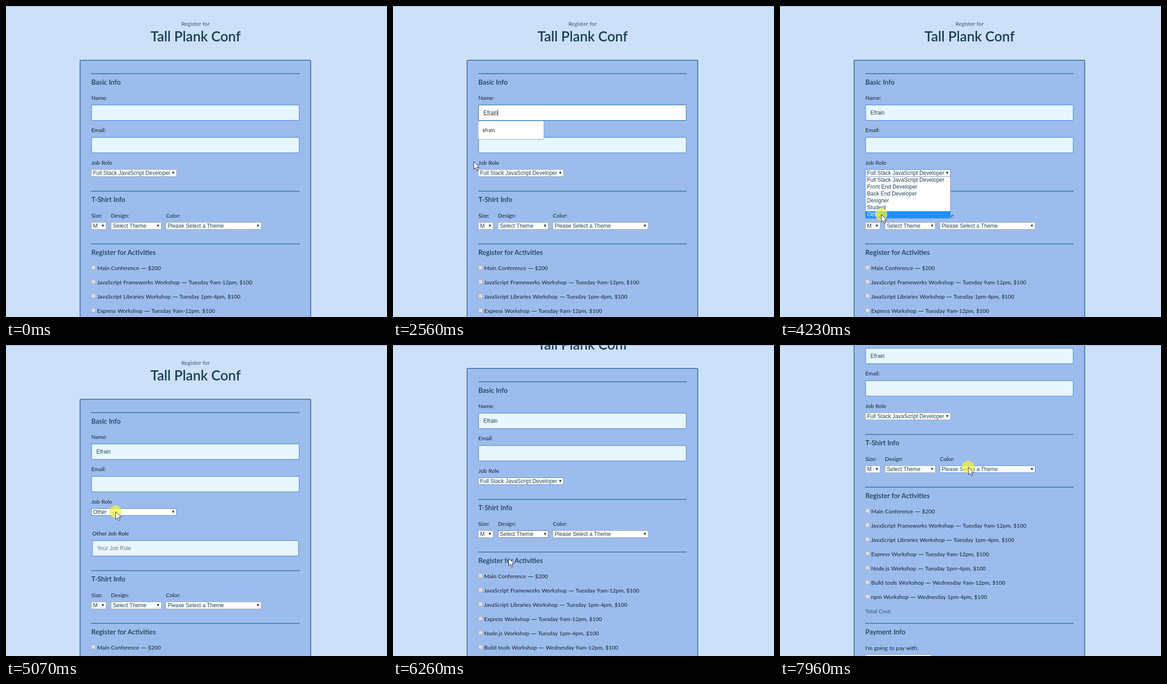
Write an HTML page that moves like this. It is 828 px wide and 676 px high and loops after 8000 ms.

```html
<!DOCTYPE html>
<html lang="en">
<head>
<meta charset="utf-8">
<title>Registration form</title>
<style>
  html, body { margin: 0; width: 100%; height: 100%; overflow: hidden; background: #cce0f9; }
  svg { display: block; width: 100%; height: 100%; }
  text { white-space: pre; }
  .label { font: 12px Lato, "Open Sans", sans-serif; letter-spacing: .03px; word-spacing: .5px; fill: #14222d; }
  .dash { font-family: "Open Sans", sans-serif; }
  .soft { fill: #34566f; }
  .head { font: 600 14.8px Lato, "Open Sans", sans-serif; fill: #183f56; }
  .title { font: 600 30px Lato, "Open Sans", sans-serif; fill: #183f56; }
  .field { font: 11.85px "Liberation Sans", Arial, sans-serif; fill: #1f4558; }
  .hint { fill: #75797c; }
  .suggest { font: 10px "Open Sans", sans-serif; fill: #111; }
  .mid { text-anchor: middle; }
  .rule { stroke: #2f6a94; stroke-width: 1.6; }
  .input { fill: #e8f6fd; stroke: #5e92dd; stroke-width: 1.4; }
  .select { fill: #fff; stroke: #a9a9a9; }
  .list { fill: #fff; stroke: #6d93c4; }
  .arrow { fill: #14242e; }
  .box { fill: #dfdfdf; stroke: #a8a8a8; stroke-width: .8; }
</style>
</head>
<body>
<svg id="stage" viewBox="0 0 828 676" preserveAspectRatio="none"></svg>
<script>
const LOOP = 8000;
const NAME = 'Efrain';
const ROW = 15;
const EXTRA = 88; // height of the optional job role block

const roles = ['Full Stack JavaScript Developer', 'Front End Developer', 'Back End Developer',
  'Designer', 'Student', 'Other'];
const themes = ['Select Theme', 'Theme - JS Puns', 'Theme - I ♥ JS'];
const activities = [
  'Main Conference — $200',
  'JavaScript Frameworks Workshop — Tuesday 9am-12pm, $100',
  'JavaScript Libraries Workshop — Tuesday 1pm-4pm, $100',
  'Express Workshop — Tuesday 9am-12pm, $100',
  'Node.js Workshop — Tuesday 1pm-4pm, $100',
  'Build tools Workshop — Wednesday 9am-12pm, $100',
  'npm Workshop — Wednesday 1pm-4pm, $100'
];

// [time, x, y]
const pointer = [
  [40, 562, 521], [790, 221, 227], [920, 221, 227], [1190, 232, 405], [1420, 228, 405],
  [2160, 184, 352], [2350, 163, 345], [2560, 175, 338], [2950, 210, 364], [3250, 222, 365],
  [3510, 240, 399], [3910, 222, 441], [4120, 220, 453], [4350, 220, 453], [4800, 238, 362],
  [5200, 238, 362], [5560, 240, 379], [5690, 240, 379], [5960, 251, 463], [6850, 251, 463],
  [7300, 275, 269], [7680, 288, 275], [7860, 409, 265], [8000, 409, 265]
];
// [time, offset]
const scrolling = [[6030, 0], [6160, 24], [6260, 66.5], [6460, 155], [6560, 195], [6660, 207.5]];
const keys = [1420, 1600, 1740, 1860, 1980, 2110];
const clicks = [900, 3000, 4200, 4880, 5620, 7380, 7860];

const text = (x, y, str, cls = 'label', id = '') =>
  `<text ${id && `id="${id}"`} class="${cls}" x="${x}" y="${y}">${str}</text>`;
const rule = y => `<path class="rule" d="M185 ${y}H638"/>`;
const section = (y, str) => rule(y) + text(185.5, y + 23.5, str, 'head');
const input = (x, y, w, id) =>
  `<rect id="${id}" class="input" x="${x}" y="${y}" width="${w}" height="33.7" rx="1.5"/>`;
const select = (x, y, w, str, id) => {
  const tip = x + w - 7;
  return `<rect id="${id}" class="select" x="${x}" y="${y}" width="${w}" height="15"/>` +
    text(x + 3.7, y + 11.7, str, 'field', id + 'Text') +
    `<path class="arrow" d="M${tip - 2.6} ${y + 5}h5.2l-2.6 5z"/>`;
};
const list = (x, y, w, items, id) =>
  `<g id="${id}"><rect class="list" x="${x}" y="${y}" width="${w}" height="${items.length * ROW + 1}"/>
   <rect id="${id}Bar" x="${x + .5}" width="${w - 1}" height="${ROW}" fill="#1e90ff"/>` +
  items.map((s, i) => text(x + 3.7, y + i * ROW + 11.2, s, 'field')).join('') + '</g>';
const activity = (str, i) => {
  const y = 564 + i * 31.05;
  return `<rect class="box" x="186" y="${y}" width="8.4" height="8.4" rx="1"/>` +
    text(198, y + 9.5, str.replace('—', '<tspan class="dash">—</tspan>'));
};

document.getElementById('stage').innerHTML = `
<rect width="828" height="676" fill="#cce0f9"/>
<g id="page">
  ${text(412, 43, 'Register for', 'label soft mid')}
  ${text(412, 77, 'Tall Plank Conf', 'title mid')}
  <rect x="161" y="117.7" width="501.3" height="1100" rx="2.5" fill="#9cbced" stroke="#2a628f" stroke-width="1.6"/>
  ${section(147, 'Basic Info')}
  ${text(185.5, 204, 'Name:')}
  ${input(186, 215, 451.3, 'name')}
  ${text(196.5, 235.7, '', 'field', 'nameText')}
  <path id="squiggle" fill="none" stroke="#e02020" stroke-width=".9"/>
  <path id="caret" stroke="#111"/>
  ${text(185.5, 274, 'Email:')}
  ${input(186, 285.5, 451.3, 'email')}
  ${text(185.5, 345, 'Job Role')}
  ${select(185.5, 355.5, 185, roles[0], 'job')}
  <g id="other">
    ${text(187.5, 414, 'Other Job Role')}
    ${input(187.7, 425, 448, 'role')}
    ${text(198, 445.7, 'Your Job Role', 'field hint')}
  </g>
  <g id="lower">
    ${section(402.5, 'T-Shirt Info')}
    ${text(185.5, 459.5, 'Size:')}${text(228, 459.5, 'Design:')}${text(347.5, 459.5, 'Color:')}
    ${select(185.5, 470.5, 32, 'M', 'size')}
    ${select(228.5, 470.5, 109, themes[0], 'design')}
    ${select(347.5, 470.5, 207, 'Please Select a Theme', 'color')}
    ${section(517, 'Register for Activities')}
    ${activities.map(activity).join('')}
    ${text(185.5, 790.5, 'Total Cost:', 'label soft')}
    ${section(813, 'Payment Info')}
    ${text(185.5, 870.5, "I'm going to pay with:")}
    ${select(185.5, 881.5, 143, 'Select Payment Method', 'pay')}
  </g>
  <g id="popup">
    <rect x="185" y="251" width="143.5" height="40" rx="2" fill="#355a8a" opacity=".3"/>
    <rect x="185.5" y="250.3" width="142" height="39" rx="2" fill="#fff" stroke="#c3cfdf" stroke-width=".6"/>
    ${text(194.5, 273.5, NAME.toLowerCase(), 'suggest')}
  </g>
  ${list(185.5, 370.5, 185, roles, 'jobList')}
  ${list(228.5, 485.5, 109, themes, 'designList')}
</g>
<path d="M0 .5H828" stroke="#94abd2"/>
<g id="pointer">
  <circle id="halo" r="13.3" fill="#f5f53c" opacity=".72"/>
  <path d="M.5 .5V17L4.3 13.4L7 19.6L9.7 18.4L7 12.4H12.2Z" fill="#fff" stroke="#111" stroke-width=".9"/>
</g>`;

const el = Object.fromEntries([...document.querySelectorAll('[id]')].map(e => [e.id, e]));
const show = (e, on) => { e.style.display = on ? '' : 'none'; };
const within = (t, a, b) => t >= a && t < b;

function sample(steps, t) {
  const next = steps.findIndex(s => s[0] > t);
  if (next === 0) return steps[0].slice(1);
  if (next < 0) return steps[steps.length - 1].slice(1);
  const a = steps[next - 1], b = steps[next];
  const k = (t - a[0]) / (b[0] - a[0]);
  return a.slice(1).map((v, i) => v + (b[i + 1] - v) * k);
}

function drawList(id, open, top, items, current, y) {
  show(el[id], open);
  if (!open) return;
  const over = Math.floor((y - top) / ROW);
  const row = over >= 0 && over < items.length ? over : current;
  el[id + 'Bar'].setAttribute('y', top + row * ROW);
  el[id].querySelectorAll('text').forEach((e, i) => { e.style.fill = i === row ? '#fff' : ''; });
}

function drawName(t) {
  const focused = within(t, 900, 3000);
  const count = keys.filter(k => k <= t).length;
  el.nameText.textContent = NAME.slice(0, count);
  el.name.style.fill = focused ? '#fff' : '';
  el.name.style.stroke = focused ? '#3f88a8' : '';
  const width = count ? el.nameText.getComputedTextLength() : 0;
  const end = 197 + width;
  const lastKey = count ? keys[count - 1] : 900;
  el.caret.setAttribute('d', `M${end} 225V238`);
  show(el.caret, focused && (t - lastKey) % 1000 < 500);
  el.squiggle.setAttribute('d', 'M196.5 238' + 'l1.5 -1.6l1.5 1.6'.repeat(Math.round(width / 3)));
  show(el.squiggle, focused && count > 2);
  show(el.popup, focused && count > 0);
}

function render(t) {
  const [x, y] = sample(pointer, t);
  const offset = Math.round(sample(scrolling, t)[0]); // whole pixels keep edges sharp
  const other = within(t, 4250, 5660);

  el.page.setAttribute('transform', `translate(0 ${-offset})`);
  el.lower.setAttribute('transform', `translate(0 ${other ? EXTRA : 0})`);
  show(el.other, other);
  drawName(t);

  el.jobText.textContent = roles[other ? 5 : 0];
  el.job.style.stroke = within(t, 3000, 7380) ? '#4f86d6' : '';
  el.design.style.stroke = within(t, 7380, 7820) ? '#4f86d6' : within(t, 5960, 7380) ? '#66727e' : '';
  el.color.style.stroke = t >= 7860 ? '#4f86d6' : '';

  drawList('jobList', within(t, 3150, 4250) || within(t, 5160, 5660), 371, roles, other ? 5 : 0, y + offset);
  drawList('designList', within(t, 7460, 7820), 486, themes, 0, y + offset);

  show(el.pointer, t >= 40);
  el.pointer.setAttribute('transform', `translate(${x} ${y})`);
  show(el.halo, clicks.some(c => within(t, c, c + 260)));
}

const start = performance.now();
function tick() {
  render((performance.now() - start) % LOOP);
  requestAnimationFrame(tick);
}
tick();
</script>
</body>
</html>
```
